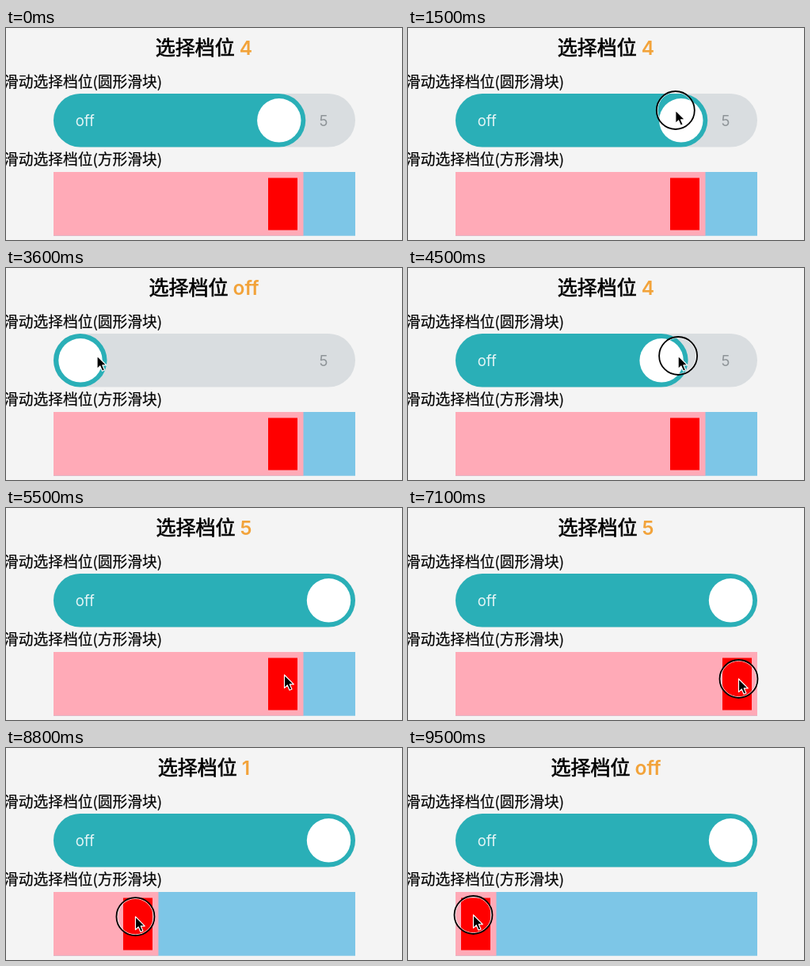
Animation of 500 by 268 pixels, one loop 9600 ms. Source, as an HTML page:

```html
<!DOCTYPE html>
<html lang="zh-CN">
<head>
<meta charset="utf-8">
<title>选择档位</title>
<style>
  html, body { margin: 0; width: 100%; height: 100%; overflow: hidden; background: #f4f4f4; }
  svg { display: block; width: 500px; height: 268px; }
  text { font-family: Inter, "Noto Sans CJK SC", "Noto Sans CJK", sans-serif; font-size: 18.5px; }
  .cjk { font-family: "Noto Sans CJK SC", "Noto Sans CJK", sans-serif; font-size: 18.75px; stroke: #000; stroke-width: .2px; }
  .title { font-size: 25px; font-weight: 500; stroke-width: .7px; }
  .value { font-family: Inter, sans-serif; font-size: 24.5px; font-weight: 600; fill: #f2a33a; stroke: none; }
</style>
</head>
<body>
<svg viewBox="0 0 500 268">
  <text class="title cjk" x="250" y="34" text-anchor="middle">选择档位<tspan id="value" class="value" dx="6">4</tspan></text>

  <text class="cjk" x="-3" y="74.5">滑动选择档位(圆形滑块)</text>
  <rect x="60" y="83" width="381" height="67.5" rx="33.75" fill="#d9dde0"/>
  <text x="401" y="124" text-anchor="middle" fill="#8e9498">5</text>
  <rect id="roundFill" x="60" y="83" height="67.5" rx="33.75" fill="#2aafb7"/>
  <text x="87.7" y="123.7" fill="#e6f5f6">off</text>
  <circle id="knob" cy="116.8" r="27.7" fill="#fff"/>

  <text class="cjk" x="-3" y="173">滑动选择档位(方形滑块)</text>
  <rect x="60" y="182" width="381" height="80.7" fill="#7dc6e7"/>
  <rect id="squareFill" x="60" y="182" height="80.7" fill="#ffaab7"/>
  <rect id="block" y="189.5" width="37" height="66" fill="#f00"/>

  <g id="cursor">
    <g id="ring" fill="none">
      <circle r="22.7" stroke="#fff" stroke-opacity=".85"/>
      <circle r="24" stroke="#000" stroke-width="1.8"/>
    </g>
    <path d="M0 0V16.6L3.8 13 6.5 19.3 9.5 18 6.8 11.9H11.8Z"
      fill="#000" stroke="#fff" stroke-width="1.2" stroke-linejoin="round"/>
  </g>
</svg>
<script>
  const LOOP = 9600, STEP = 100;
  const PRESS = 100, HOLD = 200, GLIDE = 450;  // before a drag, after it, and the move to the next
  const LEVELS = 5;

  const smooth = u => u * u * (3 - 2 * u);
  const even = u => u;
  const mix = (a, b, u) => a + (b - a) * u;
  const unit = u => Math.min(1, Math.max(0, u));
  const $ = id => document.getElementById(id);

  const round = { min: 94, max: 407.5 };
  const square = { min: 85.5, max: 415.5 };

  // grab: cursor offset from the handle; top, bottom: cursor height at start and end
  const drags = [
    { slider: round, from: 4, to: 0, start: 1600, end: 2800, ease: smooth, grab: -7, y: [104, 104] },
    { slider: round, from: 0, to: 5, start: 3900, end: 4820, ease: smooth, grab: 21, y: [111, 111] },
    { slider: square, from: 4, to: 5, start: 6200, end: 6900, ease: smooth, grab: 2, y: [211, 216] },
    { slider: square, from: 5, to: 0, start: 7200, end: 9320, ease: even, grab: -3, y: [216, 211] }
  ];
  const entry = { x: 300, y: 290, time: 700 };

  const progress = (d, t) => unit((t - d.start) / (d.end - d.start));

  function levelOf(slider, t) {
    const own = drags.filter(d => d.slider === slider);
    const d = own.findLast(d => t >= d.start) || own[0];
    return mix(d.from, d.to, d.ease(progress(d, t)));
  }

  const handleX = (slider, level) => mix(slider.min, slider.max, level / LEVELS);

  function dragPoint(d, t) {
    const u = progress(d, t);
    const level = mix(d.from, d.to, d.ease(u));
    return { x: handleX(d.slider, level) + d.grab, y: mix(...d.y, u * u) };
  }

  function cursorAt(t) {
    const i = drags.findLastIndex(d => t >= d.start);
    const d = drags[i], next = drags[i + 1];
    const here = d ? dragPoint(d, t) : entry;
    if (!next) return here;
    const leave = d ? d.end + HOLD : entry.time;
    const u = smooth(unit((t - leave) / Math.min(GLIDE, next.start - leave)));
    const there = dragPoint(next, next.start);
    return { x: mix(here.x, there.x, u), y: mix(here.y, there.y, u) };
  }

  function draw(t) {
    const knob = handleX(round, levelOf(round, t));
    const block = handleX(square, levelOf(square, t));
    const { x, y } = cursorAt(t);

    $('knob').setAttribute('cx', knob);
    $('roundFill').setAttribute('width', knob + 33.5 - 60);
    $('block').setAttribute('x', block - 18.5);
    $('squareFill').setAttribute('width', Math.min(block + 26, 441) - 60);
    $('cursor').setAttribute('transform', `translate(${x} ${y})`);

    const pressed = drags.some(d => t >= d.start - PRESS && t < d.end + HOLD);
    $('ring').setAttribute('visibility', pressed ? 'visible' : 'hidden');

    const active = drags.findLast(d => t >= d.start - PRESS) || drags[0];
    const label = String(Math.round(levelOf(active.slider, t)) || 'off');
    if ($('value').textContent !== label) $('value').textContent = label;
  }

  function tick() {
    const t = performance.now() % LOOP;
    draw(Math.floor(t / STEP) * STEP);
    requestAnimationFrame(tick);
  }
  tick();
</script>
</body>
</html>
```
